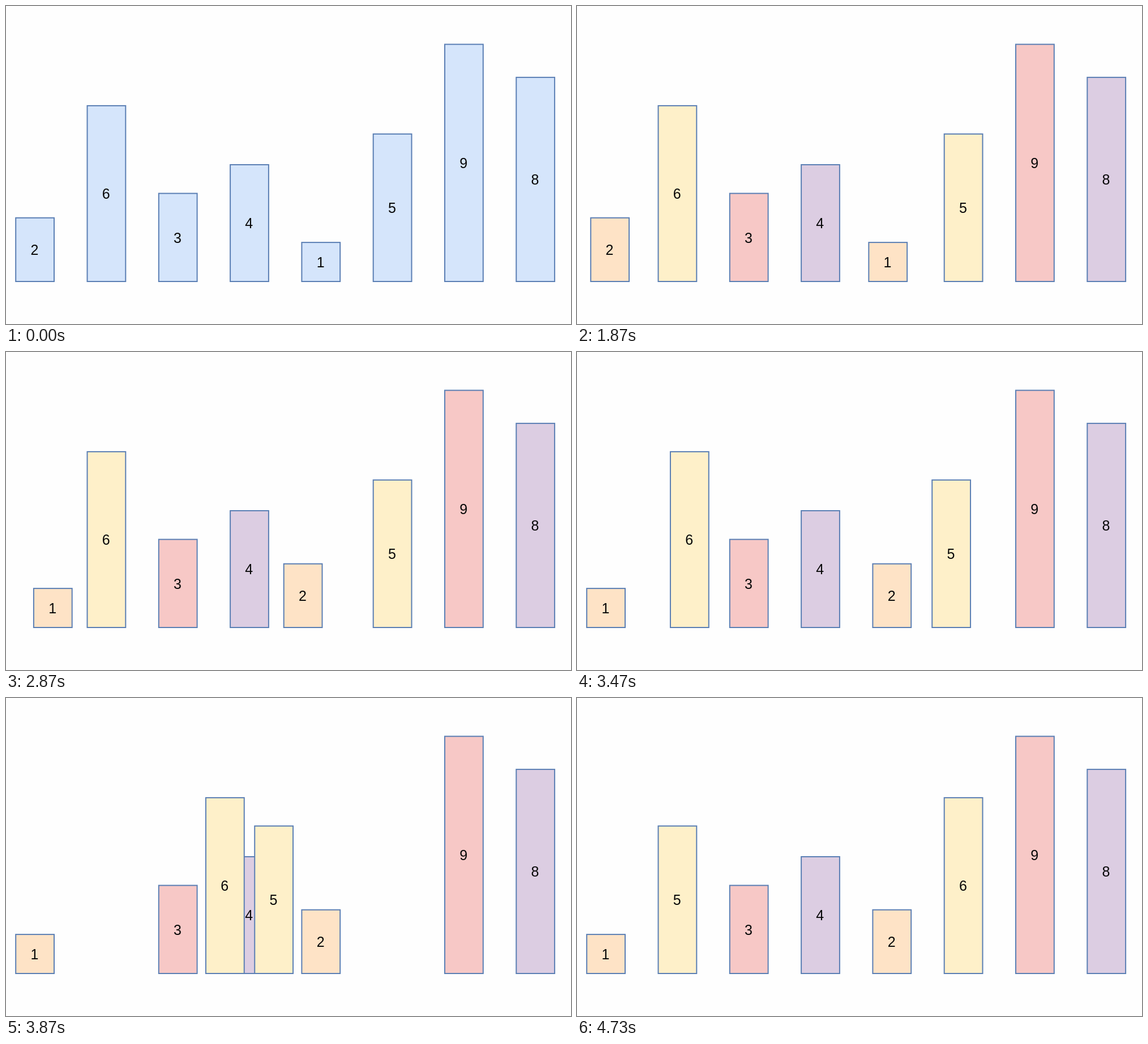
These frames come from a looping animation (998x561 px, 5800 ms). An HTML page with a canvas:

```html
<!DOCTYPE html>
<html lang="en">
<head>
<meta charset="utf-8">
<title>Sorting bars</title>
<style>
  html, body { margin: 0; width: 100%; height: 100%; overflow: hidden; background: #fefefe; }
  canvas { display: block; }
</style>
</head>
<body>
<canvas id="stage" width="998" height="561"></canvas>
<script>
const ctx = document.getElementById('stage').getContext('2d');

const LOOP = 5800;
const STEP = 1000 / 15;
const PHASE = 1500;
const FADE_AT = 200;
const SWAP_SMALL_AT = FADE_AT + PHASE;
const SWAP_TALL_AT = SWAP_SMALL_AT + PHASE;

const FLOOR = 486, BAR_W = 67.8, FIRST_X = 17.2, GAP = 126.3;

const BLUE = [213, 229, 251];
const ORANGE = [254, 227, 198];
const YELLOW = [254, 240, 201];
const RED = [247, 200, 198];
const PURPLE = [220, 205, 226];

// Listed from back to front.
const bars = [
  { label: 3, top: 330.6, from: 2, color: RED },
  { label: 4, top: 280, from: 3, color: PURPLE },
  { label: 9, top: 67.6, from: 6, color: RED },
  { label: 8, top: 125.9, from: 7, color: PURPLE },
  { label: 2, top: 373.7, from: 0, to: 4, start: SWAP_SMALL_AT, color: ORANGE },
  { label: 1, top: 417.1, from: 4, to: 0, start: SWAP_SMALL_AT, color: ORANGE },
  { label: 6, top: 175.9, from: 1, to: 5, start: SWAP_TALL_AT, color: YELLOW },
  { label: 5, top: 225.8, from: 5, to: 1, start: SWAP_TALL_AT, color: YELLOW }
];

// Knots of the glide: time, position, speed.
const glide = [
  [0, 0, 0],
  [0.1778, 0.0425, 0.579],
  [0.4444, 0.4145, 2],
  [0.6667, 0.822, 1.4],
  [1, 1, 0]
];

const mix = (a, b, k) => a + (b - a) * k;
const progress = (t, start) => Math.min(1, Math.max(0, (t - start) / PHASE));

function ease(u) {
  const i = Math.max(1, glide.findIndex(knot => u <= knot[0]));
  const [u0, p0, v0] = glide[i - 1];
  const [u1, p1, v1] = glide[i];
  const span = u1 - u0, s = (u - u0) / span, r = 1 - s;
  return p0 * r * r * (1 + 2 * s) + p1 * s * s * (3 - 2 * s)
    + span * s * r * (v0 * r - v1 * s);
}

function drawBar(bar, t) {
  const moved = bar.to === undefined ? 0 : ease(progress(t, bar.start));
  const slot = mix(bar.from, bar.to ?? bar.from, moved);
  const x = FIRST_X + GAP * slot;
  const fade = progress(t, FADE_AT);
  const rgb = BLUE.map((c, i) => Math.round(mix(c, bar.color[i], fade)));

  ctx.fillStyle = `rgb(${rgb})`;
  ctx.fillRect(x, bar.top, BAR_W, FLOOR - bar.top);
  ctx.strokeRect(x, bar.top, BAR_W, FLOOR - bar.top);
  ctx.fillStyle = '#080808';
  ctx.fillText(bar.label, x + BAR_W / 2 - 0.7, (bar.top + FLOOR) / 2 + 9.2);
}

function draw(now) {
  const t = Math.floor((now % LOOP + 5) / STEP) * STEP;
  ctx.fillStyle = '#fefefe';
  ctx.fillRect(0, 0, 998, 561);
  ctx.strokeStyle = '#5b7fb4';
  ctx.lineWidth = 2;
  ctx.font = '25px "Liberation Sans", Arial, sans-serif';
  ctx.textAlign = 'center';
  for (const bar of bars) drawBar(bar, t);
}

function tick() {
  draw(performance.now());
  requestAnimationFrame(tick);
}
tick();
</script>
</body>
</html>
```
